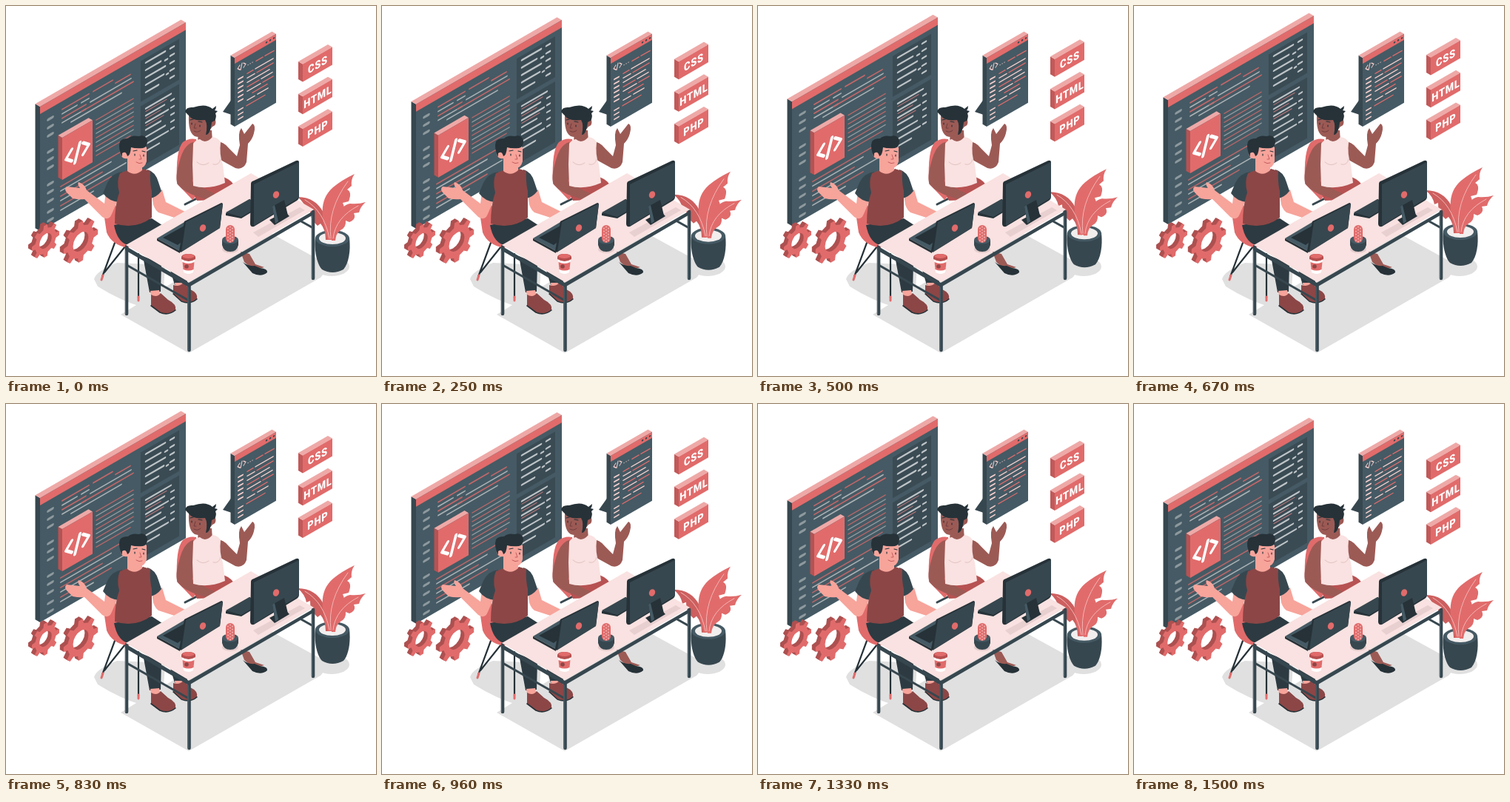
Recreate the animation shown at these times as an HTML page. Size 500 by 500 pixels, loop 1540 ms.

```html
<!DOCTYPE html>
<html lang="en">
<head>
<meta charset="utf-8">
<title>Developers at work</title>
<style>
html, body { margin: 0; width: 100%; height: 100%; overflow: hidden; background: #fff; }
svg { display: block; width: 100%; height: 100%; }
text { font-family: Roboto, sans-serif; font-weight: 800; font-size: 15px; letter-spacing: .8px; text-anchor: middle; fill: #fff; }
.line { fill: none; stroke-linecap: round; stroke-linejoin: round; }
.red { fill: #e16b6b; } .dark { fill: #37474f; } .deep { fill: #263238; }
.skin { fill: #f7a49b; } .brown { fill: #9c5a55; } .wine { fill: #8c4646; }
.pale { fill: #f9e2e1; } .shade { fill: #e0e0e0; }
</style>
</head>
<body>
<svg viewBox="0 0 500 500">
  <g class="shade">
    <path d="M155 417L247 469L425 367L438 351L345 300Z"/>
    <path d="M119 369Q122 358 150 347L215 350L212 398L185 407Q154 398 124 379Z"/>
    <ellipse cx="440" cy="352" rx="24" ry="13"/>
  </g>

  <g class="float" id="board"></g>
  <g id="bubble"><path class="dark" d="M305 126L293 143L305 147Z"/></g>
  <g id="gears"></g>
  <g class="float" id="badges"></g>

  <g class="float" id="plant">
    <path class="dark" d="M418 313C416 332 421 350 427 356Q441 364 456 356C463 348 466 331 464 313Z"/>
    <ellipse cx="441" cy="314" rx="23" ry="11" fill="#455a64"/>
    <ellipse cx="441" cy="314" rx="18" ry="8" fill="#f2eeee"/>
    <path fill="#cd5f5f" d="M438 316C436 292 429 258 394 258Q404 266 406 277L411 275Q410 288 421 297L425 294Q432 302 432 316Z"/>
    <path class="red" d="M435 316C427 290 421 263 442 245Q454 235 471 227Q466 234 467 243L461 248Q468 251 463 264L455 266Q460 274 452 286Q443 297 442 316Z"/>
    <path class="red" d="M440 317C440 293 449 270 465 267Q477 268 486 265Q479 271 477 279L470 280Q474 288 464 292L459 290Q460 299 452 303Q446 307 445 317Z"/>
    <path class="line" stroke="#f3b5b3" stroke-width="1" d="M437 314Q430 277 404 262M439 314Q434 275 462 237M442 314Q445 286 476 270"/>
  </g>

  <g id="woman">
    <path class="line" stroke="#37474f" stroke-width="3" d="M242 268L262 258"/>
    <path class="red" d="M231 240Q229 195 239 184Q247 178 257 180L264 250L252 262Z"/>
    <path fill="#b75252" d="M249 244L294 231Q306 236 309 244L282 262L258 263Z"/>
    <path class="brown" d="M284 183Q294 183 301 192L312 203L316 188Q313 171 318 165L322 173L333 159Q338 161 335 172Q333 180 327 186L325 211Q321 222 310 219L290 208Z"/>
    <path class="brown" d="M253 184Q240 187 234 212Q228 232 232 241Q242 253 261 258Q277 264 289 262Q287 254 274 250L252 237L258 214Z"/>
    <path class="brown" d="M260 168H278L279 183Q270 191 259 184Z"/>
    <path class="pale" d="M253 186Q257 180 262 180Q270 187 279 177Q287 178 290 184Q288 201 293 214L296 239Q273 249 253 243L252 214Z"/>
    <path class="line" stroke="#e3c3c3" d="M258 211Q266 218 274 212M280 214Q288 216 290 207"/>
    <path class="brown" d="M247 148Q246 171 255 176Q264 179 271 173L279 163Q285 161 283 154L275 143Z"/>
    <path class="deep" d="M242 143Q243 136 253 137Q270 131 279 139L284 135Q284 139 282 141L286 142L283 145Q285 150 282 155L278 157Q276 174 270 174Q273 160 269 154Q252 156 247 148Z"/>
    <path class="line" stroke="#263238" stroke-width="1.2" d="M249 154L253 153M260 156L265 157M251 158V160M262 161V163"/>
    <path class="line" stroke="#713d3d" d="M256 159L254 165H257M254 169Q259 172 263 168"/>
    <path class="brown" d="M317 332L329 335L337 349L349 353L335 357L322 346Z"/>
    <path class="deep" d="M320 346Q327 352 336 351L343 354Q354 355 353 360Q345 367 333 361Z"/>
  </g>

  <g id="man">
    <path class="line" stroke="#263238" stroke-width="2.2" d="M147 320L130 366M161 325L133 360M179 335V394"/>
    <path class="line" stroke="#e16b6b" stroke-width="3" d="M131 364L129 370M179 393V398"/>
    <path class="red" d="M133 286Q133 263 145 258L155 292L182 311L165 327Q143 323 136 306Z"/>
    <path class="skin" d="M135 251L133 267L109 249Q107 241 98 238Q96 241 100 246L82 244Q78 247 82 252L90 260Q99 262 106 261L130 285Q139 291 143 281L152 260Z"/>
    <path class="skin" d="M198 255L211 248L216 265L244 279Q255 282 260 290L243 291L206 279Q199 274 198 262Z"/>
    <path fill="#2d3a41" d="M146 296L197 287L217 300L190 325L162 322Q150 317 146 296Z"/>
    <path fill="#2d3a41" d="M185 338L210 348L209 386L194 387ZM222 357L246 365L244 378L228 377Z"/>
    <path class="skin" d="M195 385L207 384L209 394L197 398ZM228 374L239 374L241 384L229 386Z"/>
    <path class="wine" d="M196 390Q204 395 209 388L219 397Q231 403 229 411Q218 419 207 414L196 405ZM226 377Q234 380 240 374L249 383Q260 388 258 396Q249 404 236 398L226 389Z"/>
    <path class="line" stroke="#263238" stroke-width="1.6" d="M196 405L208 414Q219 419 229 411M226 389L237 399Q249 404 258 396"/>
    <path class="dark" d="M157 224Q143 226 137 239L131 253Q139 264 153 265ZM191 221Q202 224 206 238L210 250Q204 258 195 260Z"/>
    <path class="wine" d="M154 226L164 222Q176 230 185 220L195 223Q194 238 197 250V286Q174 303 147 294Q147 269 153 252Q149 237 154 226Z"/>
    <path class="skin" d="M164 202L184 212L184 222Q174 231 164 223Z"/>
    <path class="skin" d="M161 196Q154 197 156 203Q159 207 164 206Q166 216 175 218Q187 222 190 210L190 191L184 186L167 190Z"/>
    <path class="deep" d="M157 204Q151 192 154 183Q157 179 165 179Q170 174 179 176Q189 173 191 182Q191 191 185 192Q175 193 169 191Q168 202 164 203Q162 195 157 199Z"/>
    <path class="line" stroke="#263238" stroke-width="1.2" d="M172 196L177 195M184 196L188 197M174 200V202M186 201V203"/>
    <path class="line" stroke="#c45c5c" d="M181 201L183 207H180M176 211Q180 214 184 212"/>
  </g>

  <g id="desk">
    <path class="line" stroke="#37474f" stroke-width="3" d="M163 350L247 398M399 291L415 300"/>
    <path class="line" stroke="#37474f" stroke-width="4.6" stroke-linecap="butt" d="M163 325V416M247.500 376V465M415 278V368"/>
    <path class="line" stroke="#546a75" d="M161.500 328V416M246 378V465M413.500 283V368"/>
    <path class="dark" d="M161 324L247 374L417 276V281L247 380L161 330Z"/>
    <path class="pale" d="M162 323L331 226L416 275L247 373Z"/>
    <path fill="#e8d0d0" d="M334 306L397 272L404 276L341 312Z"/>

    <path class="deep" d="M297 280L329 261L346 270L318 287L297 283Z"/>
    <path fill="#37474f" d="M297 279L329 261L345 269L318 285Z"/>
    <path class="deep" d="M331 240Q331 237 335 236L392 209Q396 208 396 211V258Q396 261 393 263L335 298Q330 299 330 294Z"/>
    <path fill="#37474f" d="M335 241L396 211V259L335 297Z"/>
    <path class="deep" d="M356 289L377 278L383 284L363 296Z"/>
    <path class="deep" d="M360 271L376 262L381 283L364 294Z"/>
    <path fill="#455a64" d="M360 271L363 269L368 291L364 294Z"/>
    <ellipse class="red" cx="365" cy="255" rx="4" ry="5" transform="rotate(25 365 255)"/>

    <path fill="#455a64" d="M204 314L241 292L264 306L235 331Z"/>
    <path class="deep" d="M212 313L241 297L255 305L232 323ZM204 314L235 331V334L204 317Z"/>
    <path class="deep" d="M241 291L291 266Q293 266 293 268L289 300L236 333L234 331Z"/>
    <path fill="#37474f" d="M243 292L293 267L289 300L237 332Z"/>
    <ellipse class="red" cx="266" cy="300" rx="4" ry="5" transform="rotate(25 266 300)"/>

    <ellipse cx="303" cy="329" rx="11" ry="5" fill="#e5cccc"/>
    <path class="dark" d="M292 316V323Q294 332 303 332Q312 332 314 323V316Z"/>
    <ellipse cx="303" cy="316" rx="11" ry="5.500" fill="#455a64"/>
    <rect class="red" x="297" y="296" width="12" height="24" rx="6"/>
    <path class="line" stroke="#f9d3d0" stroke-width="1.2" stroke-dasharray="1 3" d="M300 300V318M303 298V319M306 300V318"/>

    <path fill="#fff" d="M238 341H255L253 360Q247 364 240 360Z"/>
    <path class="red" d="M238.500 346Q247 350 254.500 346L253.500 356Q247 359 239.500 356Z"/>
    <circle class="wine" cx="244" cy="352" r="2.800"/>
    <path fill="#b64f4f" d="M237 339Q238 335 246 335Q255 335 256 339V342Q247 348 237 342Z"/>
    <ellipse class="red" cx="246.500" cy="338" rx="8" ry="3"/>
  </g>
</svg>
<script>
const $ = id => document.getElementById(id);
const add = (id, markup) => $(id).insertAdjacentHTML('beforeend', markup);
const RED = '#e16b6b', LIGHT = '#eea9a7', DARK = '#37474f', SLATE = '#455a64', GREY = '#a9b1b5', PINK = '#f6cfcd';
const SLOPE = Math.tan(Math.PI / 6);

const stroke = (color, width, d) => `<path class="line" stroke="${color}" stroke-width="${width}" d="${d}"/>`;
const rect = (x, y, w, h, fill) => `<rect x="${x}" y="${y}" width="${w}" height="${h}" fill="${fill}"/>`;
const rows = (x, y, step, lengths) => lengths.map((w, i) => `M${x} ${y + i * step}h${w}`).join('');

// Upright isometric slab; content is placed on its front face
function slab(id, x, y, w, h, depth, front, side, top, content) {
  const dy = depth * SLOPE;
  add(id, `<g transform="translate(${x} ${y})">
    <path fill="${side}" d="M0 0l${-depth} ${-dy}v${h}l${depth} ${dy}z"/>
    <path fill="${top}" d="M0 0l${-depth} ${-dy}l${w} ${-w * SLOPE}l${depth} ${dy}z"/>
    <g transform="skewY(-30)">${rect(0, 0, w, h, front)}${content}</g></g>`);
}

const gutter = [24, 35, 46, 68, 79, 90, 112, 123, 135, 149, 161].map(v => `M11 ${v}h6`).join('');
slab('board', 46, 136, 197, 168, 6.5, SLATE, DARK, LIGHT,
  rect(0, 0, 197, 10, RED) + rect(-6.5, 6, 6.5, 0, DARK) +
  rect(136, 17, 52, 55, '#3a4b54') + rect(136, 78, 52, 82, '#3a4b54') +
  stroke('#8d999e', 3.6, gutter) +
  stroke(GREY, 1.8, 'M30 27h20M56 27h10M30 39h32M68 33h55M42 45h68') +
  stroke('#c56668', 1.8, 'M30 21h36M72 21h26M30 33h32M56 39h70M102 27h20') +
  stroke('#b96668', 1.5, rows(76, 62, 12, [50, 50, 50, 50, 46])) +
  stroke('#929ca1', 1.5, rows(76, 68, 12, [50, 50, 50, 50])) +
  stroke('#b96668', 1.8, rows(28, 124, 13, [90, 56, 68])) +
  stroke(GREY, 1.8, rows(28, 130, 13, [68, 88, 44])) +
  stroke('#bec4c7', 2.6, rows(143, 23, 10, [26, 20, 26, 24, 17]) + rows(176, 23, 10, [5, 5, 5, 5, 5]) + 'M169 35h3M171 55h2') +
  stroke('#bec4c7', 2.4, rows(143, 85, 9.6, [34, 25, 30, 20, 26, 30, 18]) + rows(177, 94, 9.6, [4, 4, 4, 4, 4])) +
  stroke('#bd7779', 1.2, rows(143, 89, 9.6, [28, 20, 24])));
slab('board', 76, 178, 41, 57, 5.5, RED, '#b55353', LIGHT,
  stroke('#fff', 4, 'M13 23L5 32L13 39M24 20L17 44M28 23L36 30L28 39'));

slab('bubble', 309, 70, 56, 93, 5.5, SLATE, DARK, LIGHT,
  rect(0, 0, 56, 8, RED) +
  stroke(DARK, 2.4, 'M43 4h.1M48 4h.1M53 4h.1') +
  stroke(PINK, 1.2, 'M7 14l-3 3l3 3M10 13l-2 8M12 14l3 3l-3 3M18 20h.1M21 20h.1M24 20h.1') +
  stroke(RED, 1.5, 'M29 21h9M41 21h12M17 31h8M30 37h22M17 49h16M38 55h14M24 61h20') +
  stroke(PINK, 1.5, 'M17 37h10M28 31h24M17 43h30M36 49h15M17 55h18M17 67h10M31 67h14') +
  stroke(PINK, 2, rows(5, 32, 6, [6, 6, 6, 6, 6, 6])) +
  stroke(PINK, 1.8, rows(5, 74, 6, [6, 6, 6])) +
  stroke(RED, 1.4, 'M16 74h25'));

['CSS', 'HTML', 'PHP'].forEach((word, i) => slab('badges', 401, 78.500 + i * 43.7, 40, 24, 6, RED, '#c25959', LIGHT,
  `<text transform="translate(20.400 17.500) scale(.866 1)">${word}</text>`));

function gear(cx, cy, radius, hole) {
  let d = '';
  for (let i = 0; i < 32; i++) {
    const tooth = i % 4 < 2;
    const r = tooth ? radius : radius * .77;
    const a = (Math.floor(i / 4) * 4 + [-.65, .65, 1.1, 2.9][i % 4]) * Math.PI / 16;
    const rim = i % 4 > 1 ? radius * .77 : r;
    d += `${i ? 'L' : 'M'}${rim * Math.cos(a)} ${rim * Math.sin(a)}`;
  }
  d += `ZM${hole} 0A${hole} ${hole} 0 1 0 ${-hole} 0A${hole} ${hole} 0 1 0 ${hole} 0Z`;
  for (let depth = 5; depth >= 0; depth--) {
    add('gears', `<path fill="${depth ? '#ad5050' : RED}" fill-rule="evenodd" d="${d}"
      transform="translate(${cx - depth} ${cy - depth * SLOPE}) skewY(-30) scale(.866 1)"/>`);
  }
}
gear(53.5, 317.5, 21.5, 9.5);
gear(101, 318.5, 27, 12);

const floating = document.querySelectorAll('.float');
function draw(now) {
  const t = now % 1540;
  const lift = Math.max(0, 10 * (1 - Math.abs(1 - t / 750)));
  floating.forEach(g => g.setAttribute('transform', `translate(0 ${-lift})`));
  requestAnimationFrame(() => draw(performance.now()));
}
draw(performance.now());
</script>
</body>
</html>
```
